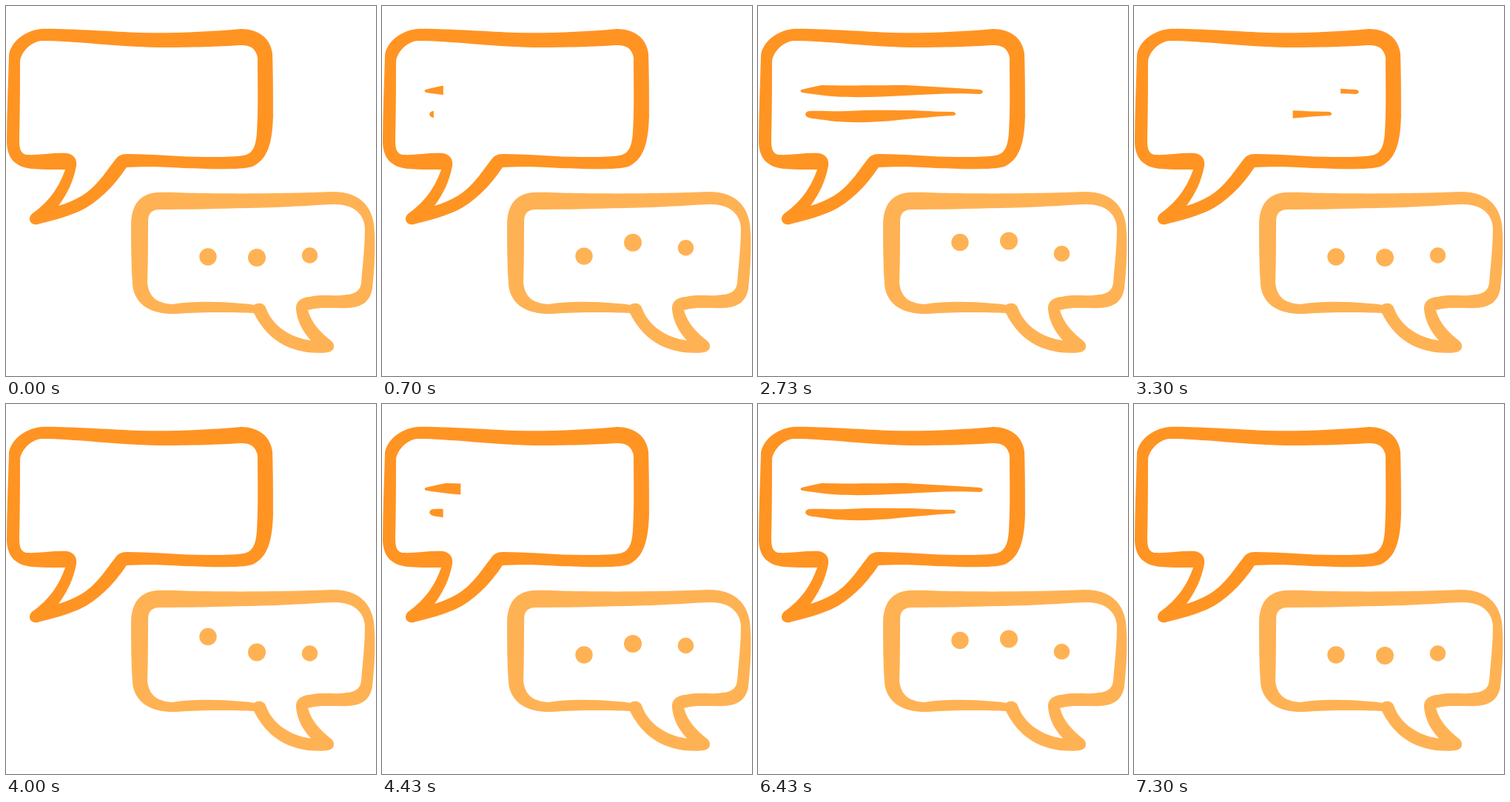
An HTML page with a canvas for the animation above (7.41 s loop, 500 by 500 pixels).

```html
<!DOCTYPE html>
<html lang="en">
<head>
<meta charset="utf-8">
<title>Chat bubbles</title>
<style>
  html, body { margin: 0; width: 100%; height: 100%; overflow: hidden; background: #fff; }
  canvas { display: block; width: 500px; height: 500px; }
</style>
</head>
<body>
<canvas id="stage" width="500" height="500"></canvas>
<script>
const ctx = document.getElementById('stage').getContext('2d');
const ORANGE = '#ff9423', LIGHT = '#ffb254';
const LOOP = 7410, CYCLE = 74, OUT_START = 45;

// Each bubble is an outer contour followed by its inner hole.
const bigBubble = new Path2D(`
  M4 66 C6 51 22 34 47 31 C80 30 145 35 180 36 C225 37 275 35 317 31
  C341 31 357 43 360 64 C361 95 361 130 361 148 C360 182 355 207 333 217
  C318 222 270 220 240 219 C210 217 185 217 163 218
  C145 245 123 266 100 277 C82 285 62 290 43 295 C34 297 28 288 35 281
  C59 264 72 244 80 221 C62 221 47 221 35 220 C15 218 2 208 1 185
  C1 145 3 105 4 66 Z
  M48 47 C36 48 22 59 19 74 C19 100 19 145 18 182 C18 193 20 199 27 201
  C45 202 62 198 83 199 C92 201 96 207 95 216 C91 238 82 255 71 270
  C95 263 112 252 124 238 C133 228 141 216 149 206 C153 201 158 200 165 200
  C200 200 235 204 270 204 C290 204 307 204 321 202 C333 200 338 190 339 170
  C341 140 340 105 340 70 C338 57 329 52 316 53 C290 55 250 56 205 56
  C150 55 92 47 48 47 Z`);

const smallBubble = new Path2D(`
  M169 294 C170 267 182 254 204 252 C225 251 245 253 270 253
  C325 254 390 253 442 251 C475 251 493 268 497 294 C500 322 498 355 495 382
  C492 400 480 407 463 408 C442 409 425 406 408 411 C413 429 425 441 440 453
  C446 459 443 467 435 468 C412 471 388 466 370 455 C355 446 343 431 335 415
  C310 414 270 413 230 416 C196 417 174 404 171 377 C169 350 169 322 169 294 Z
  M208 275 C197 275 192 280 192 292 C192 320 192 350 191 374
  C193 394 205 402 225 403 C250 399 285 399 317 402 C325 402 331 403 335 404
  C341 400 350 401 352 410 C361 432 383 448 412 452 C401 440 393 425 392 410
  C391 400 398 394 410 393 C428 389 446 393 461 390 C474 389 479 383 480 374
  C482 350 485 325 485 300 C484 279 467 267 441 268 C415 269 385 272 330 273
  C285 274 245 275 208 275 Z`);

const lines = [
  { from: 58, to: 304, start: 11.6, end: 23.4, path: new Path2D(`
    M59 113 C67 111 76 109 86 107 C120 108 165 107 200 107
    C235 109 270 111 300 113 C305 114 305 118 300 119 C265 117 235 119 200 121
    C160 123 115 125 82 120 C74 119 66 118 60 117 C57 116 57 114 59 113 Z`) },
  { from: 64, to: 267, start: 12.5, end: 25.3, path: new Path2D(`
    M69 142 C85 141 100 143 120 142 C150 140 185 141 205 141
    C230 142 248 143 264 143 C268 144 268 148 264 148 C240 149 215 152 190 154
    C155 158 120 158 96 155 C85 153 77 153 69 151 C62 149 63 143 69 142 Z`) }
];

const dots = [
  { x: 273, y: 339, r: 11.7, start: 0, end: 14.5, height: 26 },
  { x: 339, y: 340, r: 12, start: 4.5, end: 18.8, height: 25 },
  { x: 410.5, y: 337, r: 10.7, start: 8.5, end: 21, height: 10.5 }
];

const progress = (n, { start, end }) => Math.min(1, Math.max(0, (n - start) / (end - start)));
const smooth = p => p * p * (3 - 2 * p);
const hop = p => p < 1 ? Math.sin(Math.PI * p) ** 1.5 : 0;

// Twenty poses a second, with alternate poses held for 30 and 70 ms.
function poseAt(t) {
  return Math.floor(t / 100) * 2 + (t % 100 >= 30 ? 1 : 0);
}

function drawLine(line, n, leaving) {
  const p = smooth(progress(n, line));
  const edge = line.from - 2 + (line.to - line.from + 4) * p;
  ctx.save();
  ctx.beginPath();
  if (leaving) ctx.rect(edge, 90, line.to + 4 - edge, 80);
  else ctx.rect(line.from - 4, 90, p ? edge - line.from + 4 : 0, 80);
  ctx.clip();
  ctx.fill(line.path);
  ctx.restore();
}

function drawDot(dot, n) {
  ctx.beginPath();
  ctx.arc(dot.x, dot.y - dot.height * hop(progress(n, dot)), dot.r, 0, Math.PI * 2);
  ctx.fill();
}

function draw(now) {
  const pose = poseAt(now % LOOP) % CYCLE;
  const leaving = pose >= OUT_START;
  const n = leaving ? pose - OUT_START : pose;

  ctx.fillStyle = '#fff';
  ctx.fillRect(0, 0, 500, 500);

  ctx.fillStyle = ORANGE;
  ctx.fill(bigBubble, 'evenodd');
  lines.forEach(line => drawLine(line, n, leaving));

  ctx.fillStyle = LIGHT;
  ctx.fill(smallBubble, 'evenodd');
  dots.forEach(dot => drawDot(dot, n));
}

function tick() {
  draw(performance.now());
  requestAnimationFrame(tick);
}
tick();
</script>
</body>
</html>
```
